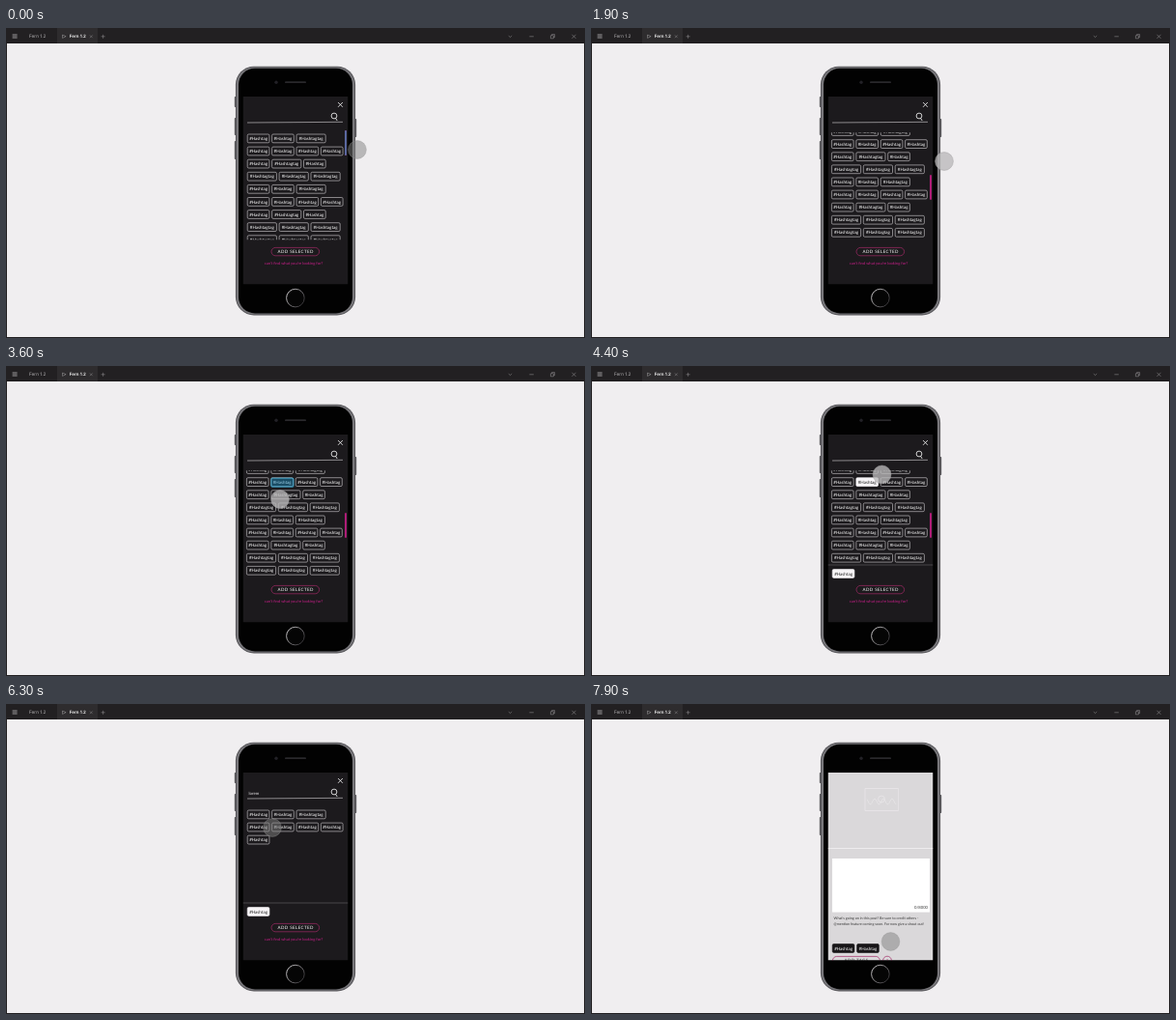
An HTML page with a canvas that plays this animation: 600 by 321 pixels, repeating every 8000 ms.

```html
<!DOCTYPE html>
<html lang="en">
<head>
<meta charset="utf-8">
<title>Hashtag picker prototype</title>
<style>
  html, body { margin: 0; width: 100%; height: 100%; overflow: hidden; background: #f0eef0; }
  canvas { display: block; width: 600px; height: 321px; }
</style>
</head>
<body>
<canvas id="stage"></canvas>
<script>
const W = 600, H = 321, LOOP = 8000, STEP = 100;
const DARK = '#1c1a1d', PINK = '#c41f86', PILL = '#a32a66', WHITE = '#fff';
const SCREEN = { x: 245.5, y: 71, w: 109, h: 194.5 };
const LEFT = 250.2, TOP = 114.4;
const scale = Math.max(1, window.devicePixelRatio || 1);

function makeContext(el) {
  el.width = Math.round(W * scale);
  el.height = Math.round(H * scale);
  const c = el.getContext('2d');
  c.scale(scale, scale);
  c.textRendering = 'geometricPrecision';
  c.textBaseline = 'middle';
  return c;
}
const main = makeContext(document.getElementById('stage'));
const layer = makeContext(document.createElement('canvas'));
let g = main;

// Drawing helpers
function paint(fill, stroke, width) {
  if (fill) { g.fillStyle = fill; g.fill(); }
  if (stroke) { g.strokeStyle = stroke; g.lineWidth = width; g.stroke(); }
}

function rect(x, y, w, h, fill) {
  g.fillStyle = fill;
  g.fillRect(x, y, w, h);
}

function box(x, y, w, h, r, fill, stroke, width = 0.7) {
  g.beginPath();
  g.roundRect(x, y, w, h, r);
  paint(fill, stroke, width);
}

function disc(x, y, r, fill, stroke, width = 0.7) {
  g.beginPath();
  g.arc(x, y, r, 0, Math.PI * 2);
  paint(fill, stroke, width);
}

function line(color, width, x0, y0, x1, y1) {
  g.beginPath();
  g.moveTo(x0, y0);
  g.lineTo(x1, y1);
  paint(null, color, width);
}

function cross(x, y, r, color, width) {
  line(color, width, x - r, y - r, x + r, y + r);
  line(color, width, x - r, y + r, x + r, y - r);
}

function text(str, x, y, size, color, { align = 'left', face = 'Lato', weight = 400, gap = 0 } = {}) {
  g.font = `${weight} ${size}px ${face}, sans-serif`;
  g.letterSpacing = gap + 'px';
  g.textAlign = align;
  g.fillStyle = color;
  g.fillText(str, x, y);
}

function clip(x, y, w, h, draw) {
  g.save();
  g.beginPath();
  g.rect(x, y, w, h);
  g.clip();
  draw();
  g.restore();
}

// Time helpers
const part = (t, a, b) => Math.min(1, Math.max(0, (t - a) / (b - a)));
const smooth = p => p * p * (3 - 2 * p);
const easeOut = p => 1 - (1 - p) ** 3.4;
const mix = (a, b, p) => a + (b - a) * p;

// Tags: S = short, L = long; the row pattern repeats
const PATTERN = ['SSL', 'SSSS', 'SLS', 'LLL'];
const ALL = Array.from({ length: 9 }, (_, r) => PATTERN[Math.min(r, 7) % 4]);
const FOUND = [...PATTERN.slice(0, 2), 'S'];
const TAGS = { S: { label: '#Hashtag', w: 22.7 }, L: { label: '#Hashtagtag', w: 30.2 } };
const FILLS = { outline: null, picked: '#f7f5f7', black: '#171517' };
const GAP = 2.7, PITCH = 13.1;

function tag(x, y, { label, w }, look = 'outline') {
  const fill = FILLS[look];
  box(x, y - 4.4, w, 8.8, 1.3, fill, fill || '#c4c2c4', 0.65);
  text(label, x + w / 2, y + 0.3, 4.5, look === 'picked' ? '#222' : WHITE, { align: 'center' });
}

function tagRows(rows, left, top, picked) {
  rows.forEach((row, r) => {
    let x = left;
    [...row].forEach((kind, i) => {
      tag(x, top + r * PITCH, TAGS[kind], picked === r + ':' + i ? 'picked' : 'outline');
      x += TAGS[kind].w + GAP;
    });
  });
}

function tagLine(count, y, look) {
  for (let i = 0; i < count; i++) tag(LEFT + i * (TAGS.S.w + GAP), y, TAGS.S, look);
}

function pill(label, y) {
  box(275, y - 4.2, 49.6, 8.4, 4.2, null, PILL);
  text(label, 300.2, y + 0.2, 4.5, WHITE, { align: 'center', gap: 0.4 });
}

function picker(query) {
  rect(SCREEN.x, SCREEN.y, SCREEN.w, SCREEN.h, DARK);
  cross(346.5, 79.4, 2.4, WHITE, 0.8);
  disc(340, 91, 2.9, null, WHITE, 0.8);
  line(WHITE, 0.8, 341.6, 93.4, 343.2, 96);
  line('#bdbbbd', 0.7, 250, 98, 349, 97.3);
  text(query, 251.6, 92.2, 4.3, '#e8e6e8');
  pill('ADD SELECTED', 231.6);
  text("can't find what you're looking for?", 298, 244, 4.1, PINK, { align: 'center' });
}

function strip(count) {
  line('#5d5b5e', 0.7, SCREEN.x, 206, 354.5, 206);
  tagLine(count, 215, 'picked');
}

function listScreen(scroll, picked) {
  picker('');
  const top = 108.2, bottom = picked ? 205.6 : 219.2;
  clip(246, top, 108, bottom - top, () =>
    tagRows(ALL, LEFT - 0.8 * scroll, TOP - 7.4 * scroll, picked && '1:1'));
  box(351, mix(106, 152, scroll), 2, 26, 1, '#ad1d76');
  if (picked) strip(1);
}

function resultScreen(count) {
  picker('lorem');
  tagRows(FOUND, LEFT, TOP, count > 1 && '0:0');
  strip(count);
}

function postScreen() {
  const faint = '#ebe9eb', ink = '#333';
  rect(SCREEN.x, SCREEN.y, SCREEN.w, SCREEN.h, '#dad8da');
  line('#f4f2f4', 0.8, SCREEN.x, 149.5, 354.5, 149.5);
  box(284, 87.5, 34.4, 23, 0, null, faint);
  disc(301, 98.5, 3.4, null, faint);
  g.beginPath();
  for (let x = 286; x <= 316; x++) g.lineTo(x, 101 + 3 * Math.sin(x * 0.7));
  paint(null, faint, 0.6);
  rect(250, 160, 101, 55.6, WHITE);
  text('0/8000', 349, 211, 4.2, ink, { align: 'right' });
  text("What's going on in this post? Be sure to credit others -", 251.6, 222, 3.7, ink);
  text('@mention feature coming soon. For now give a shout out!', 251.6, 227.8, 3.7, ink);
  tagLine(2, 253, 'black');
  box(250.4, 261.4, 49, 8.6, 4.3, null, PILL);
  text('ADD TAGS', 275, 265.4, 4.5, ink, { align: 'center', gap: 0.4 });
  disc(307, 265.6, 4.4, null, PILL);
  text('?', 307, 266, 5, PILL, { align: 'center' });
}

// Each screen dissolves in over the ones before it
const SCREENS = [
  { from: -1, to: 0, draw: t => listScreen(easeOut(part(t, 1500, 1900)), false) },
  { from: 3800, to: 4150, draw: () => listScreen(1, true) },
  { from: 5230, to: 5500, draw: () => resultScreen(1) },
  { from: 6380, to: 6700, draw: () => resultScreen(2) },
  { from: 7700, to: 7900, draw: postScreen }
];

function screens(t) {
  clip(SCREEN.x, SCREEN.y, SCREEN.w, SCREEN.h, () => {
    SCREENS.slice(SCREENS.findLastIndex(s => t >= s.to)).forEach(s => {
      const alpha = smooth(part(t, s.from, s.to));
      if (!alpha) return;
      g = layer;
      g.clearRect(0, 0, W, H);
      s.draw(t);
      g = main;
      g.globalAlpha = alpha;
      g.drawImage(layer.canvas, 0, 0, W, H);
      g.globalAlpha = 1;
    });
  });
}

// Blue flashes over the clickable parts
function hints(t) {
  g.globalAlpha = 1 - part(t, 100, 600);
  box(351, 106, 2, 26, 1, '#5a689f');
  g.globalAlpha = part(t, 3200, 3400) * (1 - part(t, 3600, 3850));
  box(274.8, 116.2, 23.2, 9, 1, 'rgba(24,140,190,.45)', '#43bce6');
  g.globalAlpha = 1;
}

function titleBar() {
  const tone = '#8a888a', face = 'Inter', y = 8.8;
  rect(0, 0, W, 16, '#222022');
  rect(53, 0, 42, 16, '#2e2c2e');
  rect(6.6, 6, 5, 5, '#5f5d5f');
  text('Fern 1.2', 24, y, 4.7, '#b5b3b5', { face });
  text('▷', 58.4, y, 5, WHITE, { face: 'DejaVu Sans' });
  text('Fern 1.2', 65.8, y, 4.5, WHITE, { face, weight: 600 });
  cross(88.3, y, 1.4, tone, 0.5);
  line(tone, 0.6, 98.6, y, 102.6, y);
  line(tone, 0.6, 100.6, y - 2, 100.6, y + 2);
  for (const side of [-1, 1]) line(tone, 0.6, 522.5 + side * 1.7, 8, 522.5, 9.6);
  line(tone, 0.6, 542.4, y, 546.8, y);
  box(565.6, 6.6, 3, 3, 0, null, tone, 0.6);
  box(564.4, 7.8, 3, 3, 0, '#222022', tone, 0.6);
  cross(588.5, y, 2, tone, 0.6);
}

function phone() {
  const button = (x, y, h) => box(x, y, 2, h, 0.7, '#58575b');
  button(236.8, 71, 11);
  button(236.8, 93, 18);
  button(236.8, 117, 19);
  button(361.2, 94, 19);
  box(237.9, 39.8, 124.2, 257.6, 19, '#504f53');
  box(238.8, 40.6, 122.4, 256, 18, '#77767a');
  box(241, 41.8, 118, 253.6, 17, '#020202');
  disc(280, 56.2, 1.7, '#222126');
  box(289, 55.3, 22, 1.8, 0.9, '#29282b');
  const ring = g.createLinearGradient(292, 274, 308, 285);
  ring.addColorStop(0, '#c4c2c4');
  ring.addColorStop(0.6, '#6b696c');
  ring.addColorStop(1, '#343235');
  disc(299.9, 279.6, 9.3, '#050505', ring, 1);
}

// Pointer stops: arrival time, length of the ride there, and whether it taps
const STOPS = [
  { at: 0, ride: 0, x: 364, y: 126, tap: true },
  { at: 1400, ride: 1300, x: 366, y: 138, tap: true },
  { at: 2900, ride: 700, x: 281, y: 159 },
  { at: 3500, ride: 500, x: 284, y: 138 },
  { at: 3800, ride: 200, x: 285, y: 126, tap: true },
  { at: 4700, ride: 700, x: 302.5, y: 111.6 },
  { at: 5100, ride: 200, x: 301.4, y: 107, tap: true },
  { at: 5900, ride: 300, x: 281, y: 124 },
  { at: 6300, ride: 300, x: 276, y: 128, tap: true },
  { at: 7600, ride: 600, x: 310.5, y: 246, tap: true }
];
const TAP = 400;

function pointer(t) {
  const i = STOPS.findLastIndex(s => t >= s.at - s.ride);
  const to = STOPS[i], from = STOPS[i - 1] || to;
  const p = to.ride ? easeOut(part(t, to.at - to.ride, to.at)) : 1;
  const down = to.tap && t >= to.at && t < to.at + TAP;
  disc(mix(from.x, to.x, p), mix(from.y, to.y, p), 9.4,
    down ? 'rgba(128,127,128,.5)' : 'rgba(186,184,186,.78)',
    down ? 'rgba(150,149,150,.5)' : 'rgba(166,164,166,.7)');
}

function draw(t) {
  rect(0, 0, W, H, '#222022');
  rect(1, 16, W - 2, H - 17, '#f0eef0');
  titleBar();
  phone();
  screens(t);
  hints(t);
  pointer(t);
}

const start = performance.now();
function tick() {
  const t = (performance.now() - start) % LOOP;
  draw(Math.floor(t / STEP) * STEP);
  requestAnimationFrame(tick);
}
tick();
</script>
</body>
</html>
```
